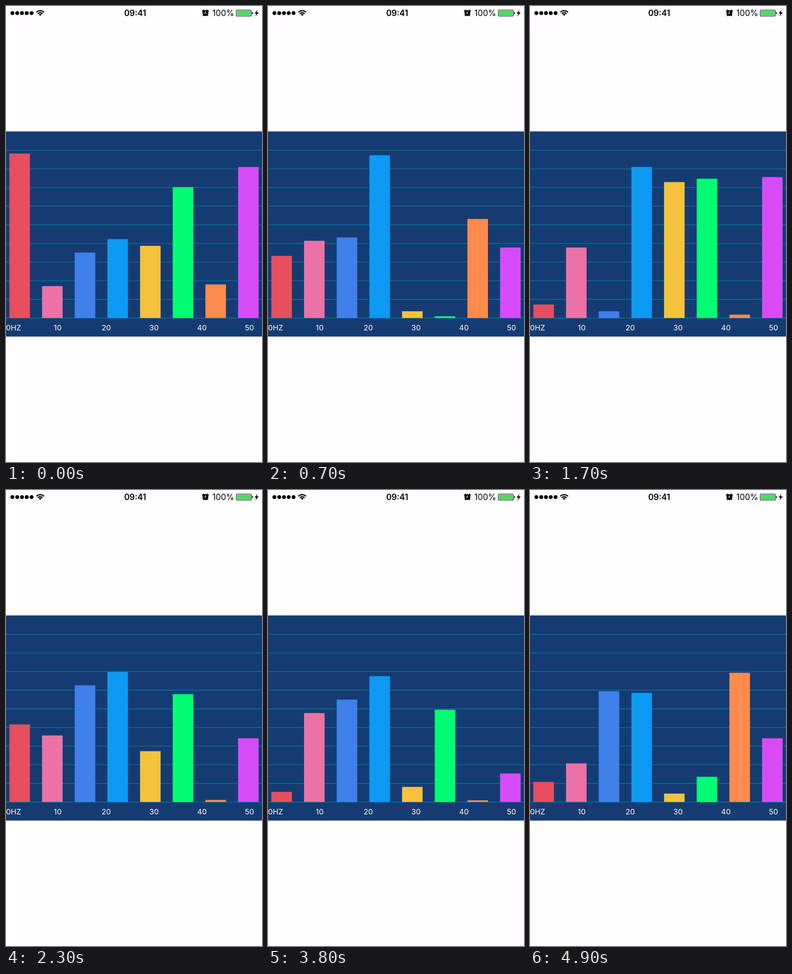
Write an HTML page that moves like this. It is 561 px wide and 998 px high and loops after 5100 ms.

```html
<!DOCTYPE html>
<html lang="en">
<head>
<meta charset="utf-8">
<title>Bar chart</title>
<style>
  html, body { margin: 0; width: 100%; height: 100%; overflow: hidden; background: #fffdff; }
  svg { display: block; width: 100%; height: 100%; font-family: Inter, Roboto, sans-serif; }
  #labels { font-size: 16.5px; fill: #fff; }
  #status { font-size: 18px; }
</style>
</head>
<body>
<svg viewBox="0 0 561 998">
  <g id="status">
    <g id="signal"></g>
    <g fill="none" stroke="#000" stroke-width="2.5">
      <path d="M66.6 13.6a12 12 0 0 1 16.8 0"/>
      <path d="M69.8 17a7.4 7.4 0 0 1 10.4 0"/>
    </g>
    <path d="M75 21.8l-3.1-3.2a4.4 4.4 0 0 1 6.2 0z"/>
    <text x="283" y="21.8" text-anchor="middle" font-weight="600">09:41</text>
    <circle cx="437" cy="15.4" r="6.5"/>
    <path d="M430 12.2a8 8 0 0 1 3.8-3.6M444 12.2a8 8 0 0 0-3.8-3.6M433 20l-1.6 1.8M441 20l1.6 1.8" fill="none" stroke="#000" stroke-width="2.2"/>
    <path d="M437.3 11.4v4.3h-3.4" fill="none" stroke="#fff" stroke-width="1.2"/>
    <text x="500" y="21.8" text-anchor="end">100%</text>
    <rect x="504.6" y="8.7" width="33" height="13.6" rx="2.6" fill="#fff" stroke="#000" stroke-width="1.1"/>
    <rect x="506" y="10.1" width="30.2" height="10.8" rx="1.4" fill="#4cd964"/>
    <path d="M539 12.8q2 .6 2 2.7t-2 2.7z"/>
    <path d="M551.2 8l-6.4 8.4h4l-2.2 6.6 7.2-9h-4.4z"/>
  </g>
  <rect y="274.5" width="561" height="449" fill="#153c72"/>
  <g id="grid" stroke="#0a6d9c" stroke-width="1.6"></g>
  <g id="bars"></g>
  <g id="labels"></g>
</svg>
<script>
const LOOP = 5100, STEP = 100, DURATION = 340;
const BASE = 682.8, GAP = 40.8, UNIT = GAP * 0.09;
const colors = ['#e74f5e', '#ec72a5', '#3f80eb', '#0c9af4', '#f5c23c', '#00ff72', '#ff8a4c', '#d64bf5'];
const levels = [
  [98, 19, 39, 47, 43, 78, 20, 90],
  [37, 46, 48, 97, 4, 1, 59, 42],
  [8, 42, 4, 90, 81, 83, 2, 84],
  [57, 39, 88, 74, 16, 59, 1, 25],
  [6, 53, 61, 75, 9, 55, 1, 17],
  [12, 23, 66, 65, 5, 15, 77, 38]
];
const starts = [0, 1030, 2063, 3100, 4130];

function add(parent, tag, attrs, text = '') {
  const node = document.createElementNS('http://www.w3.org/2000/svg', tag);
  for (const key in attrs) node.setAttribute(key, attrs[key]);
  node.textContent = text;
  return document.getElementById(parent).appendChild(node);
}

for (let i = 0; i < 5; i++) add('signal', 'circle', { cx: 14 + 10.5 * i, cy: 15.5, r: 4.3 });
for (let i = 0; i < 10; i++) {
  const y = BASE + 0.1 - GAP * i;
  add('grid', 'line', { x1: 0, x2: 561, y1: y, y2: y });
}
['0HZ', '10', '20', '30', '40', '50'].forEach((label, i) =>
  add('labels', 'text', { x: 104.7 * i, y: 709.6 }, label));
const bars = colors.map((fill, i) => add('bars', 'rect', { x: 7.4 + 71.6 * i, width: 45, fill }));

function draw(now) {
  // The chart refreshes ten times a second.
  const time = Math.floor(now % LOOP / STEP) * STEP;
  const k = starts.findLastIndex(start => start <= time);
  const p = Math.min(1, (time - starts[k]) / DURATION);
  const eased = p * p * (3 - 2 * p);
  bars.forEach((bar, i) => {
    const from = levels[k][i], to = levels[k + 1][i];
    const height = (from + (to - from) * eased) * UNIT;
    bar.setAttribute('y', BASE - height);
    bar.setAttribute('height', height);
  });
}

const begin = performance.now();
(function tick() {
  draw(performance.now() - begin);
  requestAnimationFrame(tick);
})();
</script>
</body>
</html>
```
